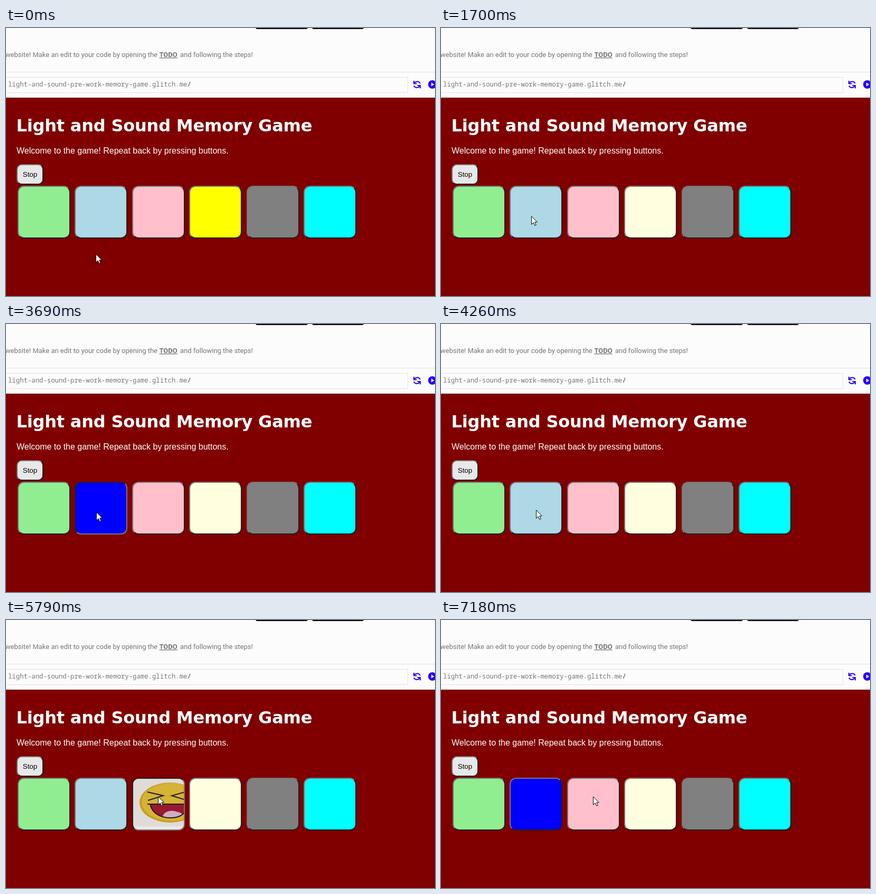
Write an HTML page that moves like this. It is 813 px wide and 508 px high and loops after 8 s.

```html
<!DOCTYPE html>
<html lang="en">
<head>
<meta charset="utf-8">
<title>Light and Sound Memory Game</title>
<style>
html, body { margin: 0; width: 100%; height: 100%; overflow: hidden; background: #800000; }
#page, #cursor { position: absolute; left: 0; top: 0; }
.note { font: 13px Roboto, sans-serif; fill: #757575; }
.url { font: 12.3px "Noto Sans Mono", monospace; fill: #777; }
.title { font: bold 32px Verdana, "DejaVu Sans", sans-serif; letter-spacing: -.2px; fill: #fff; }
.intro { font: 16px "Liberation Sans", Arial, sans-serif; fill: #fff; }
.btn {
  position: absolute; box-sizing: border-box; overflow: hidden;
  border: 2px outset #767676; border-radius: 12px;
}
.pad { top: 299px; width: 100px; height: 100px; }
.pad svg { display: none; }
.pad.lit svg { display: block; }
.pad.down { border-style: inset; }
#stop {
  left: 20px; top: 258px; width: 51px; height: 39px; border-radius: 10px; background: #e8e8e8;
  font: 13.333px/35px "Liberation Sans", Arial, sans-serif; text-align: center;
}
</style>
</head>
<body>
<svg id="page" width="813" height="508">
  <rect width="813" height="132" fill="#fcfcfc"/>
  <rect x="473" y="-10" width="99" height="12" rx="3"/>
  <rect x="580" y="-10" width="98" height="12" rx="3"/>
  <g class="note">
    <text x="287" y="55" text-anchor="end">website! Make an edit to your code by opening the</text>
    <text x="290.5" y="55" font-weight="bold" text-decoration="underline">TODO</text>
    <text x="330" y="55">and following the steps!</text>
  </g>
  <path d="M0 83.5H813" stroke="#e0e0e0"/>
  <rect x="-5.5" y="93.5" width="767" height="29" fill="#fcfcfc" stroke="#e2e2e2"/>
  <text class="url" x="4" y="111">light-and-sound-pre-work-memory-game.glitch.me<tspan fill="#333">/</tspan></text>
  <g fill="none" stroke="#2800ff" stroke-width="2">
    <path d="M773 100V105.5H778.5M773.5 105C776 100.500 782.500 100 785 105"/>
    <path d="M785 114.500V109H779.500M784.500 109.500C782 114 775.500 114.500 773 109.500"/>
  </g>
  <circle cx="808" cy="107" r="8" fill="#2800ff"/>
  <path d="M806 103.500L811.500 107L806 110.500Z" fill="#fff"/>
  <text class="title" x="19.500" y="196">Light and Sound Memory Game</text>
  <text class="intro" x="20" y="238">Welcome to the game! Repeat back by pressing buttons.</text>
</svg>
<div class="btn" id="stop">Stop</div>
<svg id="cursor" width="14" height="21">
  <path d="M.5 .8V16.300L4.200 12.900L6.700 18.400L9.200 17.400L6.800 11.900H11.400Z" fill="#fff" stroke="#000"/>
</svg>
<template id="smiley">
  <svg width="96" height="96" viewBox="241 301 96 96">
    <rect x="241" y="301" width="96" height="96" fill="#dedbd9"/>
    <rect x="241" y="391" width="96" height="6" fill="#ebe9e7"/>
    <ellipse cx="311" cy="346" rx="58" ry="38" fill="#c79d25"/>
    <ellipse cx="314" cy="345" rx="57" ry="36" fill="#d6b235"/>
    <path d="M273 349C277 367 293 375 311 375S339 370 346 349Z" fill="#981a2c"/>
    <path d="M297 372C300 362 314 360 322 363Q333 365 336 370Q316 379 297 372Z" fill="#cfacc6"/>
    <g fill="none" stroke="#201a18" stroke-width="2">
      <path d="M273 349C277 367 293 375 311 375S339 370 346 349M268 349H340"/>
      <path d="M268 326L298 333L269 342M340 326L314 333L340 341"/>
    </g>
  </svg>
</template>
<script>
const LOOP = 8000;
const idle = ["lightgreen", "lightblue", "pink", "lightyellow", "gray", "cyan"];
const glow = { 1: "blue", 3: "yellow" };

// pad, start, end, pressed by the player
const lights = [
  [3, 0, 130], [2, 440, 1420],
  [1, 1980, 2520, true], [1, 3690, 4260, true],
  [3, 4940, 5390, true], [2, 5790, 6210, true],
  [1, 7180, LOOP]
];

// time, x, y
const moves = [
  [0, 170, 428], [1280, 169, 422], [1420, 166, 393], [1560, 168, 366], [1700, 171, 356],
  [4260, 180, 352], [4380, 242, 350], [4510, 322, 346], [4650, 401, 322], [4800, 425, 321],
  [5250, 418, 321], [5390, 345, 331], [5510, 288, 334]
];

const cursor = document.getElementById("cursor");
const pads = idle.map((_, i) => {
  const pad = document.createElement("div");
  pad.className = "btn pad";
  pad.style.left = Math.round(22 + i * 108.45) + "px";
  cursor.before(pad);
  return pad;
});
pads[2].append(document.getElementById("smiley").content);

function draw(now) {
  const t = now % LOOP;
  pads.forEach((pad, i) => {
    const light = lights.find(([p, start, end]) => p === i && t >= start && t < end);
    pad.classList.toggle("lit", !!light);
    pad.classList.toggle("down", !!(light && light[3]));
    pad.style.background = light && glow[i] || idle[i];
  });
  const [, x, y] = moves.findLast(([start]) => t >= start);
  cursor.style.transform = `translate(${x}px, ${y}px)`;
  requestAnimationFrame(draw);
}
draw(0);
</script>
</body>
</html>
```
